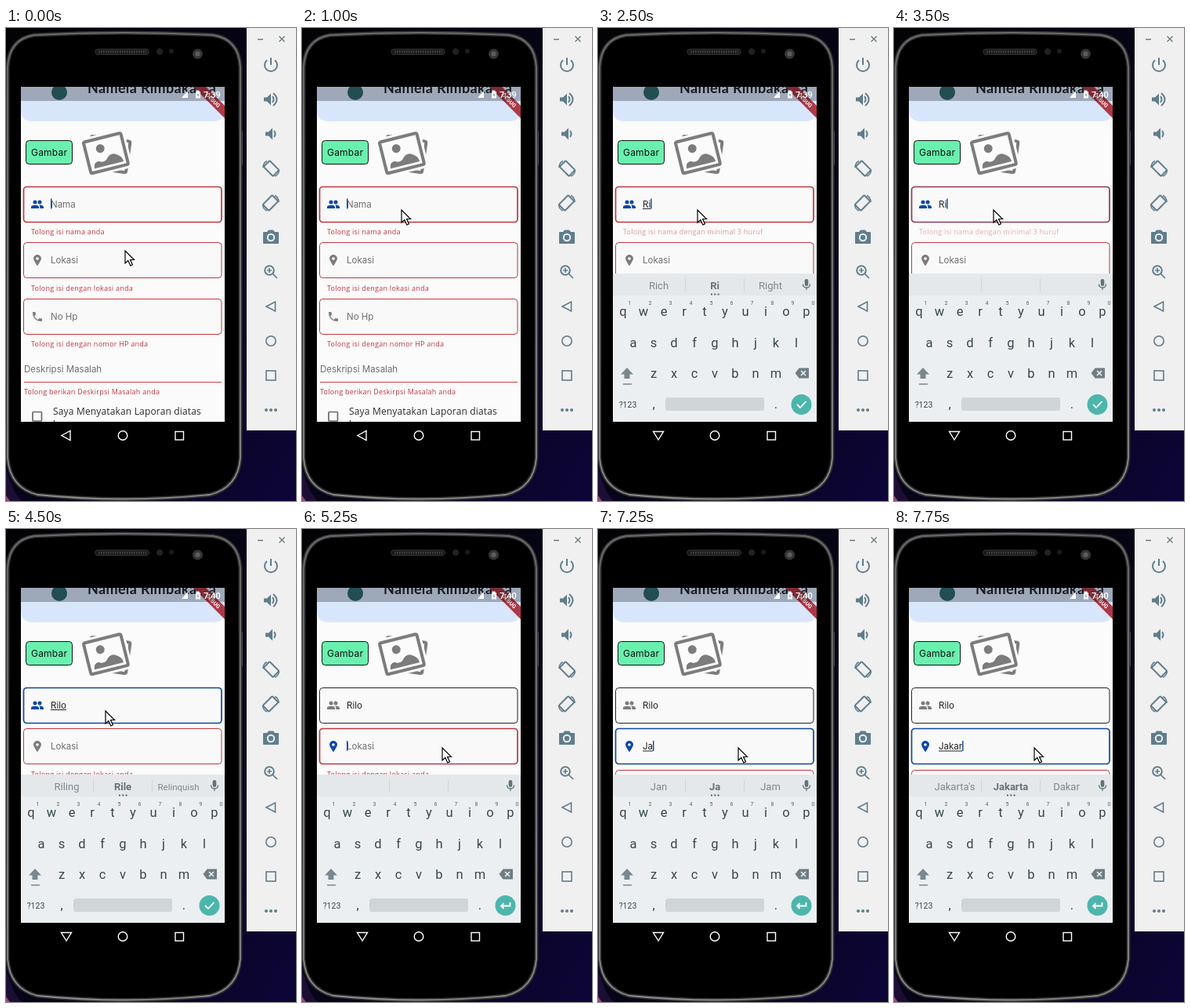
An HTML page for the animation above (8 s loop, 370x603 px).

```html
<!DOCTYPE html>
<html lang="id">
<head>
<meta charset="utf-8">
<title>Report form</title>
<style>
html, body { margin: 0; width: 100%; height: 100%; overflow: hidden; background: #050409; }
svg { display: block; }
text { white-space: pre; }
.form { font: 11.5px Inter, sans-serif; fill: #6e6e6e; }
.err { font: 9px "Open Sans", sans-serif; letter-spacing: .25px; fill: #c4343d; }
.key { font: 16.5px Roboto, sans-serif; fill: #37474f; text-anchor: middle; }
.num { font: 7px Roboto, sans-serif; fill: #52636b; text-anchor: middle; }
.sug { font: 13px Roboto, sans-serif; fill: #7b878d; text-anchor: middle; }
.line { fill: none; stroke: #5f7d8c; stroke-width: 2; }
.nav { fill: none; stroke: #fff; stroke-width: 1.4; }
</style>
</head>
<body>
<svg width="370" height="603" viewBox="0 0 370 603">
  <defs>
    <linearGradient id="desk" x1="0" y1="0" x2="1" y2="1">
      <stop offset="0" stop-color="#030305"/><stop offset=".6" stop-color="#07051a"/><stop offset="1" stop-color="#0d0538"/>
    </linearGradient>
    <linearGradient id="shell" x1="0" y1="0" x2="0" y2="1">
      <stop offset="0" stop-color="#6a6a6a"/><stop offset="1" stop-color="#8a8a8a"/>
    </linearGradient>
    <clipPath id="screen"><rect x="19" y="75" width="260" height="427"/></clipPath>
    <g id="people">
      <circle cx="-3" cy="-3" r="2.5"/><circle cx="3" cy="-3" r="2.5"/>
      <path d="M-8 5V3C-8 0 2 0 2 3V5ZM3.3 5V3Q3.3 1.4 2.2 .6Q8 .6 8 3.2V5Z"/>
    </g>
    <path id="pin" fill-rule="evenodd" d="M0 7Q-5-.5-5-2.5A5 5 0 0 1 5-2.5Q5-.5 0 7ZM1.800-2.500A1.800 1.800 0 1 0-1.800-2.500A1.800 1.800 0 1 0 1.800-2.500Z"/>
    <path id="phone" d="M-6-6H-2.500L-2-2.500L-4-.7Q-2.500 2.500 .7 4L2.500 2L6 2.500V6Q-6 6-6-6Z"/>
    <path id="case" d="M2 50Q4 14 36 9Q150 3 264 9Q297 14 299 50V548Q296 586 260 595Q150 606 40 595Q5 586 2 548Z"/>
  </defs>

  <rect width="370" height="603" fill="url(#desk)"/>
  <path d="M0 560Q8 592 20 603H0Z" fill="#1d0e35"/>
  <path d="M0 596L5 603H0Z" fill="#9a4a72"/>

  <g id="body">
    <rect x="298" y="131" width="4" height="44" rx="1.500" fill="#6a6a6a"/>
    <use href="#case" fill="#000" stroke="#303030" stroke-width="5"/>
    <use href="#case" fill="none" stroke="url(#shell)" stroke-width="1.800"/>
    <rect x="114" y="27" width="68" height="6.500" rx="3" fill="#161616" stroke="#3c3c3c"/>
    <path d="M118 30.200H179" stroke="#4b4b4b" stroke-width="3" stroke-dasharray="1.500 1.500"/>
    <circle cx="196" cy="30" r="4" fill="#222"/><circle cx="211" cy="29.500" r="3" fill="#1c1c1c"/>
    <circle cx="244.500" cy="33" r="6.500" fill="#343434"/><circle cx="244.500" cy="33" r="3.200" fill="#585b62"/>
  </g>

  <g clip-path="url(#screen)">
    <rect x="19" y="75" width="260" height="427" fill="#fbfbfb"/>
    <path d="M19 75H279V104Q279 119 264 119H34Q19 119 19 104Z" fill="#d8e6fc"/>
    <circle cx="68" cy="82" r="10" fill="#2f6a70"/>
    <text x="104" y="83" style="font:700 18px Lato,sans-serif;letter-spacing:.35px" fill="#20242b">Namela Rimbakarsa</text>
    <rect x="25.500" y="143.500" width="59" height="30" rx="4" fill="#69f0ae" stroke="#111"/>
    <text class="form" x="32" y="163" style="fill:#111;font-size:12px;letter-spacing:.2px">Gambar</text>

    <g fill="none" stroke="#7c7c7c" stroke-width="4" stroke-linejoin="round">
      <rect x="106" y="141" width="50" height="40" rx="2" transform="rotate(8 131 161)"/>
      <g transform="rotate(-14 128 160)">
        <rect x="101" y="137" width="53" height="45" rx="3" stroke="#fbfbfb" stroke-width="6"/>
        <rect x="103" y="139" width="49" height="41" rx="2" fill="#fbfbfb"/>
        <g fill="#7c7c7c" stroke="none"><circle cx="122" cy="152" r="5.500"/>
        <path d="M109 175Q109 167 116 167Q121 171 126 168Q133 159 140 164Q147 168 147 175Z"/></g>
      </g>
    </g>

    <g id="f0"></g><g id="f1"></g>
    <g id="rest">
      <g id="f2"></g>
      <text class="form" x="23" y="438.500">Deskripsi Masalah</text>
      <path d="M23 451.500H275" stroke="#c4434b"/>
      <text class="err" x="23" y="466.500">Tolong berikan Deskirpsi Masalah anda</text>
      <rect x="34" y="489.500" width="11.500" height="11.500" rx="1" fill="none" stroke="#686868" stroke-width="1.700"/>
      <g style="font:12px 'Open Sans',sans-serif;letter-spacing:.16px" fill="#2a2a2a">
        <text x="60" y="493">Saya Menyatakan Laporan diatas</text><text x="60" y="509.500">benar</text>
      </g>
    </g>

    <path d="M239 75H255L279 99V115Z" fill="#ad3847"/>
    <text transform="translate(262.500 94) rotate(45)" text-anchor="middle" style="font:700 7px Roboto,sans-serif" fill="#fff">DEBUG</text>
    <rect x="19" y="75" width="260" height="18" fill="#000" opacity=".27"/>
    <g fill="#fff">
      <path d="M224 89L232 80V89Z"/><path d="M242 81H243.500V79.500H246.500V81H248V89.500H242Z"/>
      <path d="M245.500 82L243.500 86H245L244.500 88.500L246.500 85H245Z" fill="#8993a2"/>
      <text id="clock" x="252" y="88.500" style="font:500 11px Roboto,sans-serif"></text>
    </g>

    <g id="board">
      <rect x="19" y="313" width="260" height="189" fill="#eceff1"/>
      <rect x="19" y="313" width="260" height="28" fill="#e4e8eb"/>
      <path d="M111.500 319V336M186.500 319V336" stroke="#cfd5d8"/>
      <g id="sugs"></g>
      <path id="dots" d="M144 339.500H155" stroke="#5a666c" stroke-width="2" stroke-dasharray="2 2.300"/>
      <rect x="263.700" y="320" width="4.600" height="9" rx="2.300" fill="#64747c"/>
      <path d="M261.500 326.500Q261.500 331 266 331T270.500 326.500M266 331V334" fill="none" stroke="#64747c" stroke-width="1.300"/>
      <g id="keys"></g>
      <path d="M37 433L45 441.500H40.500V447H33.500V441.500H29Z" fill="#7a878d"/><path d="M32 454H43" stroke="#7a878d" stroke-width="1.500"/>
      <path d="M251.500 440L256.500 433.500H269V446.500H256.500Z" fill="#6f7d84"/>
      <path d="M259 437L265 443M265 437L259 443" stroke="#eceff1" stroke-width="1.600"/>
      <rect x="86" y="471" width="126" height="17" rx="3" fill="#d0d5d8"/>
      <circle cx="259.500" cy="480" r="13" fill="#4db6ac"/>
      <path id="enter" fill="none" stroke="#fff" stroke-width="1.800"/>
    </g>
  </g>

  <path id="back" class="nav"/>
  <circle class="nav" cx="149" cy="519.500" r="5.800"/>
  <rect class="nav" x="216" y="514.500" width="10.500" height="10.500"/>

  <rect x="307" width="63" height="513" fill="#f0f0f0"/>
  <path d="M321 14.500H328M348.500 10.500L355.500 17.500M355.500 10.500L348.500 17.500" stroke="#6a7880" stroke-width="1.300"/>
  <g id="tools" class="line">
    <path d="M338 38V47M333 41A8 8 0 1 0 343 41"/>
    <g id="speaker"><path d="M329 88.500H333L338 83.500V98.500L333 93.500H329Z" fill="#5f7d8c" stroke="none"/><path d="M340 87Q343 91 340 95"/></g>
    <path d="M341 83Q350 91 341 99"/>
    <use href="#speaker" x="2" y="44"/>
    <g id="turn">
      <rect x="333" y="170.500" width="11" height="17" rx="1" transform="rotate(-45 338.500 179)"/>
      <path d="M328 178Q328 172 333 169.500M343 189Q348 187 348.500 181" stroke-width="1.600"/>
    </g>
    <use href="#turn" transform="translate(676 44) scale(-1 1)"/>
    <path d="M329 260H333L335 257.500H341L343 260H347Q348 260 348 261V274Q348 275 347 275H329Q328 275 328 274V261Q328 260 329 260Z" fill="#5f7d8c" stroke="none"/>
    <circle cx="338" cy="267" r="4.200" stroke="#f0f0f0"/>
    <circle cx="336" cy="309" r="5.800"/><path d="M340 313L346 319M333 309H339M336 306V312" stroke-width="1.700"/>
    <path d="M332 355L343.500 349V361Z" stroke-width="1.600"/>
    <circle cx="338" cy="399" r="6.200" stroke-width="1.600"/>
    <rect x="332" y="437" width="12" height="12" stroke-width="1.600"/>
    <g fill="#5f7d8c" stroke="none"><circle cx="332" cy="487" r="2"/><circle cx="338" cy="487" r="2"/><circle cx="344" cy="487" r="2"/></g>
  </g>

  <path id="mouse" d="M0 0V16L3.800 12.500L6.800 19L9.400 17.800L6.500 11.500H11.500Z" fill="#fff" stroke="#000" stroke-width="1.200"/>
</svg>

<script>
const $ = id => document.getElementById(id);
const LOOP = 8000;
const BLUE = '#0d47a1', RED = '#bf3840', MIX = '#8a3a55', GREY = '#7d7d7d', DARK = '#222';

// Form fields share one layout: box, icon, label, typed text, caret and error line.
const fields = [['people', 'Nama', 203], ['pin', 'Lokasi', 274.5], ['phone', 'No Hp', 346]].map(([icon, label, y], i) => {
  const g = $('f' + i);
  g.innerHTML = `<rect x="22.500" y="${Math.floor(y) - .5}" width="252.500" height="45" rx="4" fill="#f9f9f9"/>
    <use href="#${icon}" x="40" y="${y + 22}"/>
    <text class="form" x="57" y="${y + 25.5}"></text>
    <path stroke="${DARK}"/><path stroke="${BLUE}" stroke-width="1.400"/>
    <text class="err" x="32" y="${y + 60}"></text>`;
  const [box, mark, text, under, caret, err] = g.children;
  return { g, label, y, box, mark, text, under, caret, err };
});

function drawField(f, { value = '', color, width = 1, focus, line, caret, error = '', fade = 1, dy = 0 }) {
  f.g.setAttribute('transform', `translate(0 ${dy})`);
  f.box.setAttribute('stroke', color);
  f.box.setAttribute('stroke-width', width);
  f.mark.setAttribute('fill', focus ? BLUE : GREY);
  f.text.textContent = value || f.label;
  f.text.style.fill = value ? DARK : '';
  const end = 57 + (value ? f.text.getComputedTextLength() : 0);
  f.under.setAttribute('d', line && value ? `M57 ${f.y + 27.5}H${end}` : '');
  f.caret.setAttribute('d', caret ? `M${end + .7} ${f.y + 14.5}v13` : '');
  f.err.textContent = error;
  f.err.style.opacity = fade;
}

// Keyboard letters
const put = (cls, x, y, s, style = '') => `<text class="${cls}" x="${x}" y="${y}" style="${style}">${s}</text>`;
$('keys').innerHTML = [['qwertyuiop', 32, 367], ['asdfghjkl', 45, 406.5], ['zxcvbnm', 71, 446]].map(([row, x, y], r) =>
  [...row].map((c, i) => put('key', x + 26 * i, y, c) + (r ? '' : put('num', x + 8.5 + 26 * i, 353, (i + 1) % 10))).join('')
).join('') + put('key', 38, 484, '?123', 'font-size:10.5px') + put('key', 71, 485, ',') + put('key', 227, 485, '.');

const EMPTY = 'Tolong isi nama anda', SHORT = 'Tolong isi nama dengan minimal 3 huruf';

// Each step lists only what changes.
const steps = [
  [0, { mouse: [152, 284], clock: '7:39', board: 0, at: 0, caret: 1, name: '', place: '', c0: RED, c1: RED,
        e0: EMPTY, fade0: 1, fade1: 1, up: 0, up2: 0, sug: '', line: 0 }],
  [250, { mouse: [132, 237] }],
  [500, { mouse: [127, 232], caret: 0 }],
  [1000, { caret: 1 }],
  [1250, { board: .9 }],
  [1500, { board: 1, caret: 0 }],
  [2000, { caret: 1 }],
  [2250, { name: 'R', sug: 'Re,R,Ro', line: 1 }],
  [2500, { name: 'Ri', e0: SHORT, fade0: .5, sug: 'Rich,Ri,Right' }],
  [2750, { clock: '7:40', fade0: 1 }],
  [3250, { caret: 0 }],
  [3500, { caret: 1, c0: MIX, fade0: .4, sug: '', line: 0 }],
  [3750, { name: 'Ril', c0: BLUE, e0: '', up: -19, sug: 'Rill,Ril,Rile', line: 1 }],
  [4000, { name: 'Rilo', sug: 'Riling,Rile,Relinquish' }],
  [4500, { caret: 0 }],
  [4750, { mouse: [148, 250] }],
  [5000, { mouse: [179, 279] }],
  [5250, { at: 1, c0: DARK, caret: 1, sug: '' }],
  [5750, { caret: 0 }],
  [6000, { caret: 1 }],
  [6500, { caret: 0 }],
  [7000, { place: 'J', caret: 1, c1: MIX, fade1: .4 }],
  [7250, { place: 'Ja', c1: BLUE, fade1: 0, up2: -19, sug: 'Jan,Ja,Jam' }],
  [7500, { place: 'Jaka', sug: 'Jaka,Jakarta,Jalan' }],
  [7750, { place: 'Jakar', sug: "Jakarta's,Jakarta,Dakar" }]
];

function draw(s) {
  const first = s.at === 0;
  drawField(fields[0], { value: s.name, color: s.c0, width: first ? 1.7 : 1, focus: first, line: first && s.line,
    caret: first && s.caret, error: s.e0, fade: s.fade0 });
  drawField(fields[1], { value: s.place, color: s.c1, width: first ? 1 : 1.7, focus: !first, line: 1,
    caret: !first && s.caret, error: 'Tolong isi dengan lokasi anda', fade: s.fade1, dy: s.up });
  drawField(fields[2], { color: RED, error: 'Tolong isi dengan nomor HP anda' });
  $('rest').setAttribute('transform', `translate(0 ${s.up + s.up2})`);
  $('mouse').setAttribute('transform', `translate(${s.mouse})`);
  $('clock').textContent = s.clock;
  $('board').style.opacity = s.board;
  $('back').setAttribute('d', s.board ? 'M70.5 514.5H83.5L77 525Z' : 'M71 519.5L82 513.5V525.5Z');
  $('enter').setAttribute('d', first ? 'M254 480L258 484L265.5 476' : 'M265.5 476V480.5H254M257.5 477L254 480.5L257.5 484');
  const words = s.sug ? s.sug.split(',') : [];
  $('sugs').innerHTML = words.map((w, i) => put('sug', [77.5, 149, 220][i], 332.5, w,
    (i === 1 ? 'font-weight:700;fill:#65737a;' : '') + (w.length > 9 ? 'font-size:11.5px' : ''))).join('');
  $('dots').style.opacity = words.length ? 1 : 0;
}

let shown = -1;
function tick(now) {
  const t = now % LOOP;
  const past = steps.filter(([at]) => at <= t);
  if (past.length !== shown) {
    shown = past.length;
    draw(Object.assign({}, ...past.map(p => p[1])));
  }
  requestAnimationFrame(tick);
}
tick(0);
</script>
</body>
</html>
```
